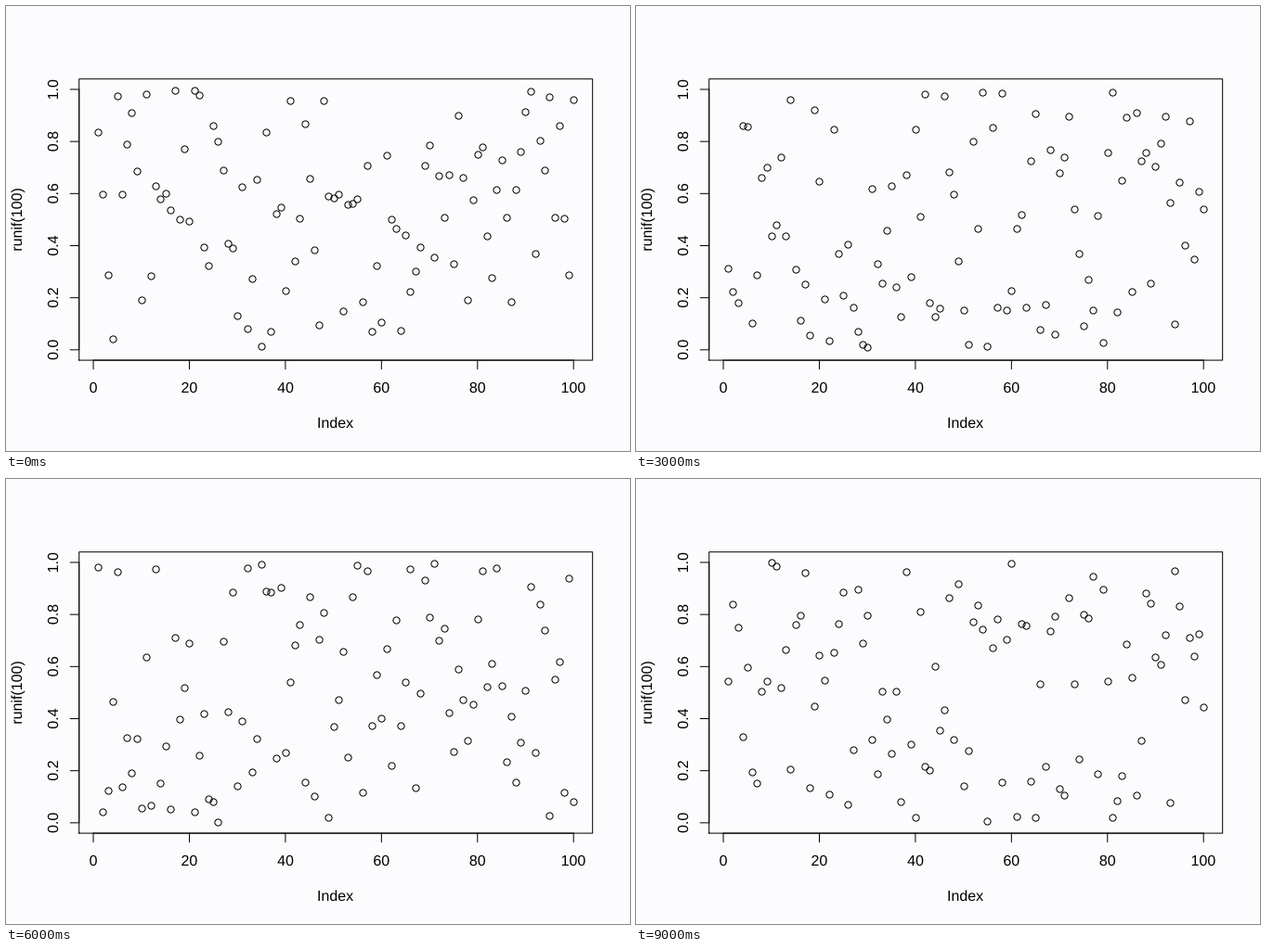
A matplotlib script for the animation above (10000 ms loop, 672 px wide and 480 px high).

```python
import numpy as np
import matplotlib.pyplot as plt
from matplotlib.animation import FuncAnimation
from matplotlib.patches import PathPatch
from matplotlib.textpath import TextPath
from matplotlib.transforms import Affine2D

W, H, DPI = 672, 480, 96
PX = 72 / DPI          # one pixel in points
FONT = 16              # text size in pixels
LINE = 1.2 * FONT      # height of one margin line
LEFT, RIGHT, TOP, BOTTOM = 78.72, 631.68, 78.72, 382.08
TICK = LINE / 2
COUNT, FRAMES, SEED = 100, 10, 100
PAPER, INK = "#fcfcfe", "black"

plt.rcParams["font.family"] = "Liberation Sans"


def scale(v, lo, hi, start, end):
    """Map lo..hi to start..end, leaving 4% padding on both sides."""
    pad = 0.04 * (hi - lo)
    return start + (v - lo + pad) / (hi - lo + 2 * pad) * (end - start)


def to_x(v):
    return scale(v, 1, COUNT, LEFT, RIGHT)


def to_y(v):
    return scale(v, 0, 1, BOTTOM, TOP)


def sample(i):
    return np.random.default_rng(SEED + i).random(COUNT)


fig = plt.figure(figsize=(W / DPI, H / DPI), dpi=DPI, facecolor=PAPER)
ax = fig.add_axes([0, 0, 1, 1])
ax.set_xlim(0, W)
ax.set_ylim(H, 0)
ax.axis("off")


def stroke(xs, ys):
    ax.plot(xs, ys, color=INK, lw=PX, snap=False,
            solid_capstyle="round", solid_joinstyle="round")


def label(x, y, text, angle=0):
    """Draw text centred on its baseline point, turned anticlockwise."""
    path = TextPath((0, 0), text, size=FONT)
    box = path.get_extents()
    place = (Affine2D().translate(-(box.x0 + box.x1) / 2, 0)
             .scale(1, -1).rotate_deg(-angle).translate(x, y))
    ax.add_patch(PathPatch(place.transform_path(path), fc=INK, lw=0,
                           snap=False))


def draw_axes():
    stroke([LEFT, RIGHT, RIGHT, LEFT, LEFT], [BOTTOM, BOTTOM, TOP, TOP, BOTTOM])
    stroke([to_x(0), to_x(100)], [BOTTOM, BOTTOM])
    stroke([LEFT, LEFT], [to_y(0), to_y(1)])
    for k in range(6):
        x, y = to_x(20 * k), to_y(k / 5)
        stroke([x, x], [BOTTOM, BOTTOM + TICK])
        stroke([LEFT, LEFT - TICK], [y, y])
        label(x, round(BOTTOM + 1.8 * LINE), str(20 * k))
        label(round(LEFT - 1.2 * LINE), y, f"{k / 5:.1f}", 90)
    label((LEFT + RIGHT) / 2, round(BOTTOM + 3.8 * LINE), "Index")
    label(round(LEFT - 3.2 * LINE), (TOP + BOTTOM) / 2, "runif(100)", 90)


draw_axes()
dots, = ax.plot(to_x(np.arange(1, COUNT + 1)), to_y(sample(0)), "o",
                ms=7.2 * PX, mfc="none", mec=INK, mew=PX)


def update(i):
    dots.set_ydata(to_y(sample(i)))
    return dots,


anim = FuncAnimation(fig, update, frames=FRAMES, interval=1000,
                     repeat=True, repeat_delay=0)
plt.show()
```
